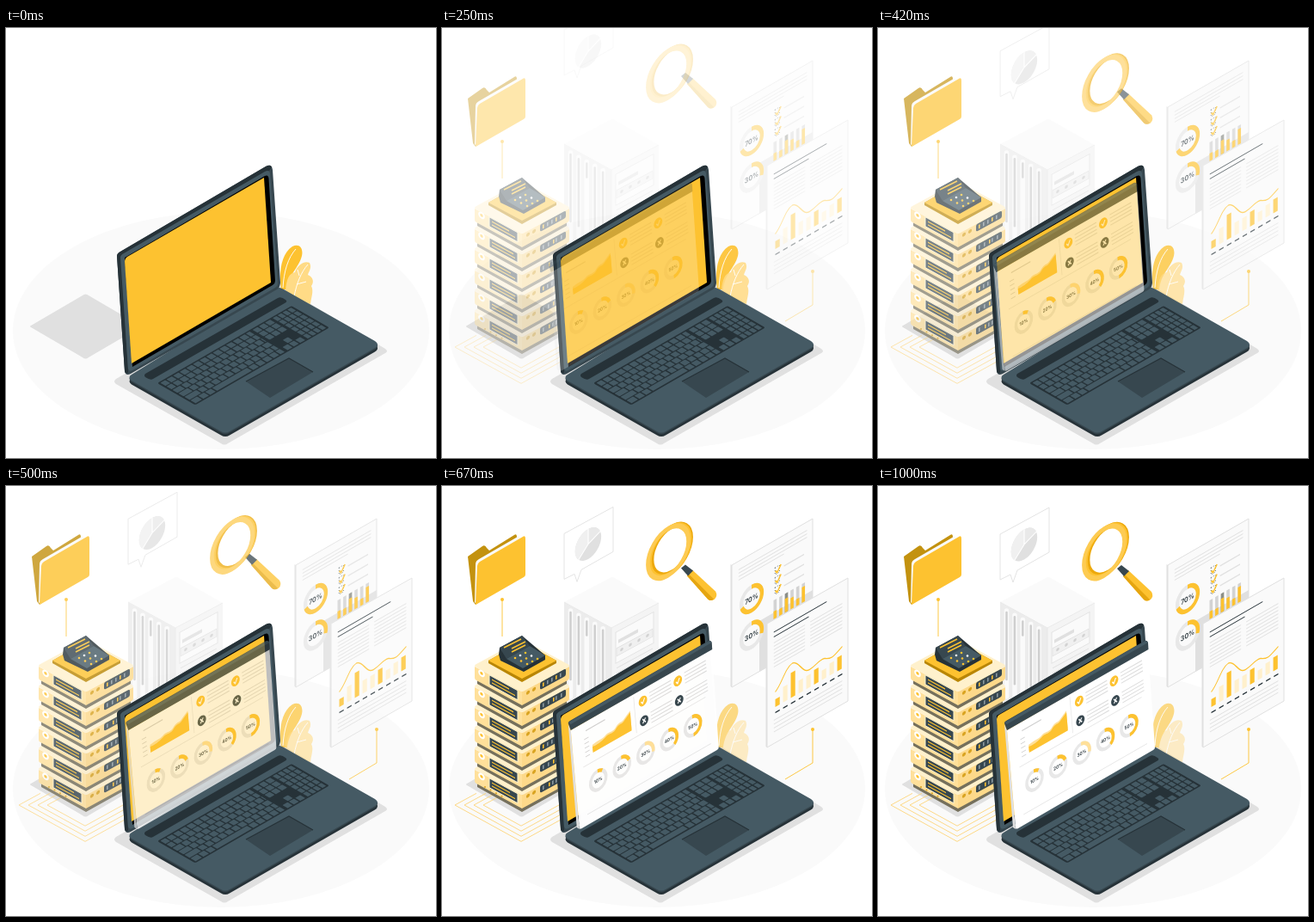
Recreate the animation shown at these times as an HTML page. Size 500x500 px, loop 1.04 s.

```html
<!DOCTYPE html>
<html lang="en">
<head>
<meta charset="utf-8">
<title>Data dashboard</title>
<style>
html, body { margin: 0; width: 100%; height: 100%; overflow: hidden; background: #fff; }
svg { display: block; width: 100vw; height: 100vh; }
text { font-family: Inter, "Open Sans", sans-serif; font-weight: 600; text-anchor: middle; fill: #263238; }
</style>
</head>
<body>
<svg id="stage" viewBox="0 0 500 500"></svg>
<script>
const Y = '#fdc230', DARK = '#37474f', INK = '#263238', SLATE = '#455a64', GREY = '#e0e0e0', LIGHT = '#f0f0f0';

// Markup helpers
const path = (d, fill, extra = '') => `<path d="${d}" fill="${fill}" ${extra}/>`;
const line = (d, color, width = 1, extra = '') => path(d, 'none', `stroke="${color}" stroke-width="${width}" ${extra}`);
const rect = (x, y, w, h, fill, extra = '') => `<rect x="${x}" y="${y}" width="${w}" height="${h}" fill="${fill}" ${extra}/>`;
const dot = (x, y, r, fill, extra = '') => `<circle cx="${x}" cy="${y}" r="${r}" fill="${fill}" ${extra}/>`;
const skew = (m, body) => `<g transform="matrix(${m})">${body}</g>`;
const group = (id, body) => `<g id="${id}">${body}</g>`;
const repeat = (n, fn) => Array.from({ length: n }, (_, i) => fn(i)).join('');
const rows = (x1, x2, y, n, step, color = GREY, width = 1) =>
  repeat(n, i => line(`M${x1} ${y + i * step}H${x2}`, color, width));

function gauge(x, y, r, width, percent, size, color = Y) {
  return dot(x, y, r, 'none', `stroke="#e8e8e8" stroke-width="${width}"`) +
    dot(x, y, r, 'none', `stroke="${color}" stroke-width="${width}" pathLength="100" stroke-dasharray="${percent} 100" transform="rotate(-90 ${x} ${y})"`) +
    `<text x="${x}" y="${y + size * .36}" font-size="${size}">${percent}%</text>`;
}

function floorLines() {
  return repeat(4, i => {
    const w = 77 - i * 11;
    return line(`M${117 - w} ${371 - 13.6}L${92 - w} 371L92 ${371 + w * .55}L138 ${371 + (w - 46) * .55}`, '#fdd57a', .9);
  });
}

function server(i) {
  const y = 209 + i * 24;
  const left = rect(17, 1.5, 33, 11, DARK, 'stroke="#fff3d0" stroke-width="1"') +
    line(`M20 5.2H${40 + i * 5 % 8}M20 9H47`, Y, 1.3) +
    dot(8, 4.5, 3.8, '#fff') + dot(8, 4.5, 1.7, Y);
  const right = dot(7, 5, 2.1, '#d9a321') + dot(14, 5, 2.1, '#d9a321') +
    rect(21, 1, 30, 8.5, DARK, 'rx="2"') +
    repeat(5, k => rect(24 + k * 5 + i * k % 3, 3, 1.6, 4.5, (k + i) % 3 ? '#8b999f' : Y));
  return path(`M41 ${y + 12}L93 ${y + 40}L145 ${y + 12}V${y + 21}L93 ${y + 50}L41 ${y + 21}Z`, '#75705c') +
    path(`M38 ${y + 1}L93 ${y + 30}V${y + 46}L40 ${y + 17}Q38 ${y + 16} 38 ${y + 14}Z`, '#ffe09a') +
    path(`M93 ${y + 30}L148 ${y + 1}V${y + 14}Q148 ${y + 16} 146 ${y + 17}L93 ${y + 46}Z`, '#fdd98a') +
    path(`M40 ${y - 2}L90 ${y - 29}Q93 ${y - 31} 96 ${y - 29}L146 ${y - 2}Q150 ${y} 146 ${y + 2}L96 ${y + 29}Q93 ${y + 31} 90 ${y + 29}L40 ${y + 2}Q36 ${y} 40 ${y - 2}Z`, '#fff1cc') +
    skew(`1,.545,0,1,38,${y}`, left) + skew(`1,-.545,0,1,93,${y + 30}`, right);
}

function servers() {
  const chip =
    path('M54 203L93 181L133 203V206L93 228L54 206Z', '#b98604') +
    path('M54 203L93 181L133 203L93 224Z', Y) +
    path('M66 196L67 188L93 174L120 197V202L95 216L68 203Z', INK) +
    path('M67 188L93 174L102 186L75 201Z', DARK) +
    path('M75 201L102 186L120 197L94 212Z', SLATE) +
    line('M72 188L92 178M81 189L97 181M81 193L97 185', Y, 1.4) +
    repeat(9, i => dot(85 + (i % 3) * 6 + (i / 3 | 0) * 7, 200 - (i % 3) * 3 + (i / 3 | 0) * 3.5, 1.3, i % 4 == 1 ? '#fff' : Y));
  return repeat(6, i => server(5 - i)) + chip + repeat(4, i => dot(50 + i * 6.5, 350 + i * 3.6, 1, '#d9a321'));
}

function folder() {
  return path('M30 82L47 70Q50 68 52 72L55 75L84 57Q87 55 87 59V100L39 138L36 134Z', '#c3920f') +
    path('M38 136L39 91Q39 87 43 85L88 59Q91 58 91 62V100Z', '#fafafa') +
    path('M39 137L41 93Q41 90 44 88L94 59Q97 57 97 61V103Q97 105 95 106L41 137Q39 138 39 137Z', Y);
}

function tower() {
  return path('M142 135L197 165V300L142 270Z', '#ececec') +
    path('M197 165L252 136V270L197 300Z', '#f4f4f4') +
    path('M142 135L195 107Q198 105 201 107L252 136L197 165Z', '#fafafa') +
    line('M142 135L197 165L252 136M197 165V290', '#e6e6e6', .8) +
    repeat(5, i => {
      const x = 149.5 + i * 9.4, y = 145 + i * 5.2;
      return line(`M${x} ${y}V${y + 100}`, '#fafafa', 5.5, 'stroke-linecap="round"') +
        line(`M${x} ${y + 2}V${y + (i == 2 ? 18 : 80)}`, '#cfcfcf', 2.5, 'stroke-linecap="round"');
    }) +
    skew('1,-.54,0,1,197,165', rect(5, 8, 44, 36, '#fafafa', 'stroke="#e4e4e4"') +
      rect(8, 18, 23, 4, GREY) + rect(6, 27, 42, 9, LIGHT, `stroke="${GREY}" stroke-width=".8"`) +
      repeat(4, i => dot(12 + i * 10, 31.5, 1.8, '#d2d2d2')) + rows(6, 48, 50, 5, 6));
}

function backReport() {
  const tick = y => rect(58, y - 4, 6, 8, 'none', `stroke="${DARK}" stroke-width=".7" stroke-dasharray="1 2"`) +
    line(`M58.5 ${y}l2.5 3l5 -7`, Y, 2) + line(`M70 ${y}H97`, GREY, 1.4);
  const bars = repeat(6, i => {
    const x = 56 + i * 7.6, mid = [13, 14, 6, 9, 14, 4][i];
    return rect(x, 69, 4.2, 22, i == 2 ? '#8c8f88' : '#d3d3d3') + rect(x, 69 + mid, 4.2, 22 - mid, Y);
  });
  return path('M337 92L335.5 91V233L337 234Z', GREY) +
    path('M337 92L431 38V180L337 234Z', '#fafafa', `stroke="${GREY}" stroke-width="1"`) +
    path('M369 157L431 121V140L378 170V211L369 216Z', GREY) +
    skew('.866,-.5,0,1,337,92', rows(9, 101, 10, 3, 4) + rows(9, 70, 22, 1, 4) +
      gauge(26.6, 52.3, 13.8, 5, 70, 8.2) + gauge(26.6, 94.8, 13.8, 5, 30, 8.2) +
      tick(36) + tick(47.5) + tick(59) + bars);
}

function frontReport() {
  const heights = [9, 18, 29, 15, 15, 17, 11, 14, 16];
  return path('M378 160L376.5 159V303L378 304Z', GREY) +
    path('M378 160L472 107V250L378 304Z', '#fafafa', `stroke="${GREY}" stroke-width="1"`) +
    skew('.866,-.5,0,1,378,160', line('M9 14.5H80M9 20H56', INK, 1.2) +
      rows(9, 51, 27, 8, 4) + rows(58, 101, 27, 8, 4) +
      repeat(9, i => rect(11 + i * 10.4, 102.5 - heights[i], 6, heights[i], [0, 2, 5, 8].includes(i) ? Y : '#fff0cc')) +
      line('M11 85C20 80 24 64 34 63C43 64 47 82 57 82C66 82 69 77 77 79C87 85 89 83 101 77', Y, 1.3) +
      line('M11 109H102', INK, 1.4, 'stroke-dasharray="6 4.5"') + rows(9, 101, 117, 4, 4.5));
}

function plant() {
  return group('leaf', path('M320 304C317 285 320 262 333 254C341 250 346 256 344 265C340 280 329 285 327 304Z', Y) +
      line('M322 302C323 283 328 267 337 257', '#fff', .9)) +
    group('frond', path('M325 306C326 292 329 285 336 284C338 277 346 270 353 273C356 279 352 283 351 287C358 290 358 296 355 300C358 306 355 312 354 321L328 312Z', '#ffdb86') +
      line('M335 312C338 297 343 284 351 275M338 298L349 295M341 288L339 281', '#fff', .9));
}

function keyboard() {
  const key = (x, y, w, h = 6) => rect(x, y, w - 1.4, h, SLATE, 'rx=".6"');
  let out = rect(0, 0, 156, 44, INK, 'rx="2"');
  [7, 7, 10, 12, 15, 9].forEach((first, r) => {
    const y = 1.5 + r * 7;
    let x = 2;
    const put = w => { out += key(x, y, w); x += w; };
    put(first);
    if (r == 5) [8, 8, 42, 8, 8, 8].forEach(put);
    while (x < 98) put(7.7);
    put(107 - x);
    for (let c = 0; c < 3; c++)
      if (r < 3 || r == 5 || (r == 4 && c == 1)) out += key(109 + c * 7.3, y, 7.3);
    for (let c = 0; c < 4; c++) out += key(132.5 + c * 5.7, y, 5.7);
  });
  return skew('1,-.577,1,.577,176,413', out);
}

function laptop() {
  const base = 'M146 403L311 301Q318 301 323 304L429 364Q435 368 429 372L260 469Q255 472 250 469L146 410Q141 406 146 403Z';
  return `<g transform="translate(0 4.5)">${path(base, INK)}</g><g transform="translate(0 1.5)">${path(base, DARK)}</g>` + path(base, SLATE) +
    path('M162 402L316 314Q320 312 325 316Q328 318 324 320L171 408Q168 410 162 406Q160 404 162 402Z', INK) +
    keyboard() +
    path('M279 411L329 384L357 400L307 430Z', DARK) + line('M279 411L329 384L357 400', INK, 1.2) +
    path('M129 266Q129 262 133 260L302 161Q309 157 310 165L319 296Q319 301 315 304L145 402Q139 405 138 399Z', DARK) +
    path('M129 265Q129 262 133 260L302 161Q308 158 309 162L306 166L137 264Q134 266 134 270L142 401Q138 402 138 399Z', INK) +
    path('M133 267Q133 264 137 262L301 167Q306 164 307 169L316 297Q316 300 313 302L147 398Q143 400 142 396Z', SLATE) +
    path('M138 267L301 172Q305 170 305.5 175L313 294Q313 297 310 299L147 394Z', '#000') +
    path('M138 271Q138 268 141 266L300 174L308 296L146 390Z', Y);
}

function dashboard() {
  const badge = (x, y, ok) => dot(x, y, 5.7, ok ? Y : DARK) +
    line(ok ? `M${x - 2.5} ${y}l2 2.5l3 -5` : `M${x - 2} ${y - 2.5}l4 5m0 -5l-4 5`, '#fff', 1.4) +
    rows(x + 9, x + 38, y - 5, 4, 4, '#dcdcdc', 1.1);
  const area = 'M26 32C33 30 37 32 43 30C49 27 52 31 57 28C63 22 66 27 70 23L78 18V39H26Z';
  const content = line('M84 3V45M12 49H176M12 104H178', '#e8e8e8', .9) +
    line('M19 10H45', '#cfcfcf', 1.2) + rows(16, 22, 19, 5, 5, '#d5d5d5') +
    path(area, '#ffe09a', 'transform="translate(0 -2)"') + path(area.replace('C33 30', 'C33 33'), Y) +
    badge(95.5, 13.5, true) + badge(142.4, 13.5, true) + badge(95, 36, false) + badge(142, 36, false) +
    repeat(5, i => gauge(29.8 + i * 31.75, 72.8, 10.4, 4, 10 + i * 10, 5.4, i == 2 ? '#ffe09a' : Y));
  return path('M147 277L157 397L160 399L150 284Z', GREY) +
    path('M150 284L314 189L322 304Q322 306 320 307L163 398Q160 400 160 397Z', '#fff') +
    skew('.866,-.497,.085,1,150,284', content) +
    path('M147 276Q147 274 149 273L310 180Q313 179 314 182L314.5 190L150 284Z', DARK) +
    path('M147 275L311 180L314 182L150 277Z', SLATE);
}

function handle() {
  return path('M285 105L291 98L318 123Q321 128 317 132Q313 135 309 132Z', Y) +
    path('M285 105L287 103L316 132Q312 135 309 132Z', '#e5a510') +
    path('M278 96L283 92L292 99L286 105Z', DARK);
}

function lens() {
  const ring = (x, y, r, color, width) => skew(`.866,-.5,0,1,${x},${y}`, dot(0, 0, r, 'none', `stroke="${color}" stroke-width="${width}"`));
  return ring(267, 74, 26.3, '#eda90c', 5) + ring(265, 75.5, 27, Y, 5) + ring(263, 77, 27.2, '#fdcb52', 5.4);
}

function pie() {
  return skew('.866,-.5,0,1,170,68', dot(0, 0, 17.5, GREY) +
    path('M0 0V-17.5A17.5 17.5 0 0 0 -13 12Z', LIGHT) +
    path('M0 0V-17.5A17.5 17.5 0 0 1 16 -7Z', '#e9e9e9') +
    line('M0 -18V0L-13 12M0 0L17 -7', '#fff', 1.4));
}

const $ = id => document.getElementById(id);
$('stage').innerHTML =
  '<ellipse cx="250" cy="352" rx="242" ry="138" fill="#fafafa"/>' +
  path('M29 346L89 311Q92.5 308 96 311L156 346Q158 347 156 348L96 383Q92.5 386 89 383L29 348Q27 347 29 346Z', GREY) +
  path('M128 408L318 299L441 373Q445 376 441 378L258 483Q254 486 250 483L128 414Q124 411 128 408Z', GREY) +
  group('bubble', path('M142 56L199 25V77L162 98L157 112L154 103L142 109Z', '#fff', 'stroke="#e4e4e4" stroke-width="1"')) +
  group('pie', pie()) +
  group('scene', tower() + floorLines() + servers() + folder() +
    line('M70 132V175M431 283V322L399 341', Y, .9) + dot(70, 132, 2, Y) + dot(431, 283, 2, Y) +
    backReport() + frontReport()) +
  plant() + laptop() + group('dashboard', dashboard()) + group('handle', handle()) + group('lens', lens());

// Cubic-bezier easing solved by bisection
function bezier(x1, y1, x2, y2) {
  const at = (a, b, s) => 3 * (1 - s) * (1 - s) * s * a + 3 * (1 - s) * s * s * b + s * s * s;
  return t => {
    let lo = 0, hi = 1;
    for (let i = 0; i < 24; i++) {
      const mid = (lo + hi) / 2;
      if (at(x1, x2, mid) < t) lo = mid; else hi = mid;
    }
    return at(y1, y2, lo);
  };
}
const bounce = bezier(.36, -.01, .5, 1.38);
const clamp = v => Math.max(0, Math.min(1, v));
const slides = { dashboard: [-30, 0], lens: [0, -30], handle: [0, -52], pie: [0, -53], bubble: [0, -70] };

function draw(now) {
  const t = Math.min(1, now % 1040 / 1000), b = bounce(t);
  for (const [id, [dx, dy]] of Object.entries(slides)) {
    $(id).setAttribute('transform', `translate(${dx * (1 - b)} ${dy * (1 - b)})`);
    $(id).setAttribute('opacity', clamp(b));
  }
  $('scene').setAttribute('opacity', clamp(t * 1.6));
  $('leaf').setAttribute('opacity', 1 - .42 * clamp(b));
  $('frond').setAttribute('opacity', 1 - .55 * clamp(b));
}
const start = performance.now();
function tick() {
  draw(performance.now() - start);
  requestAnimationFrame(tick);
}
tick();
</script>
</body>
</html>
```
